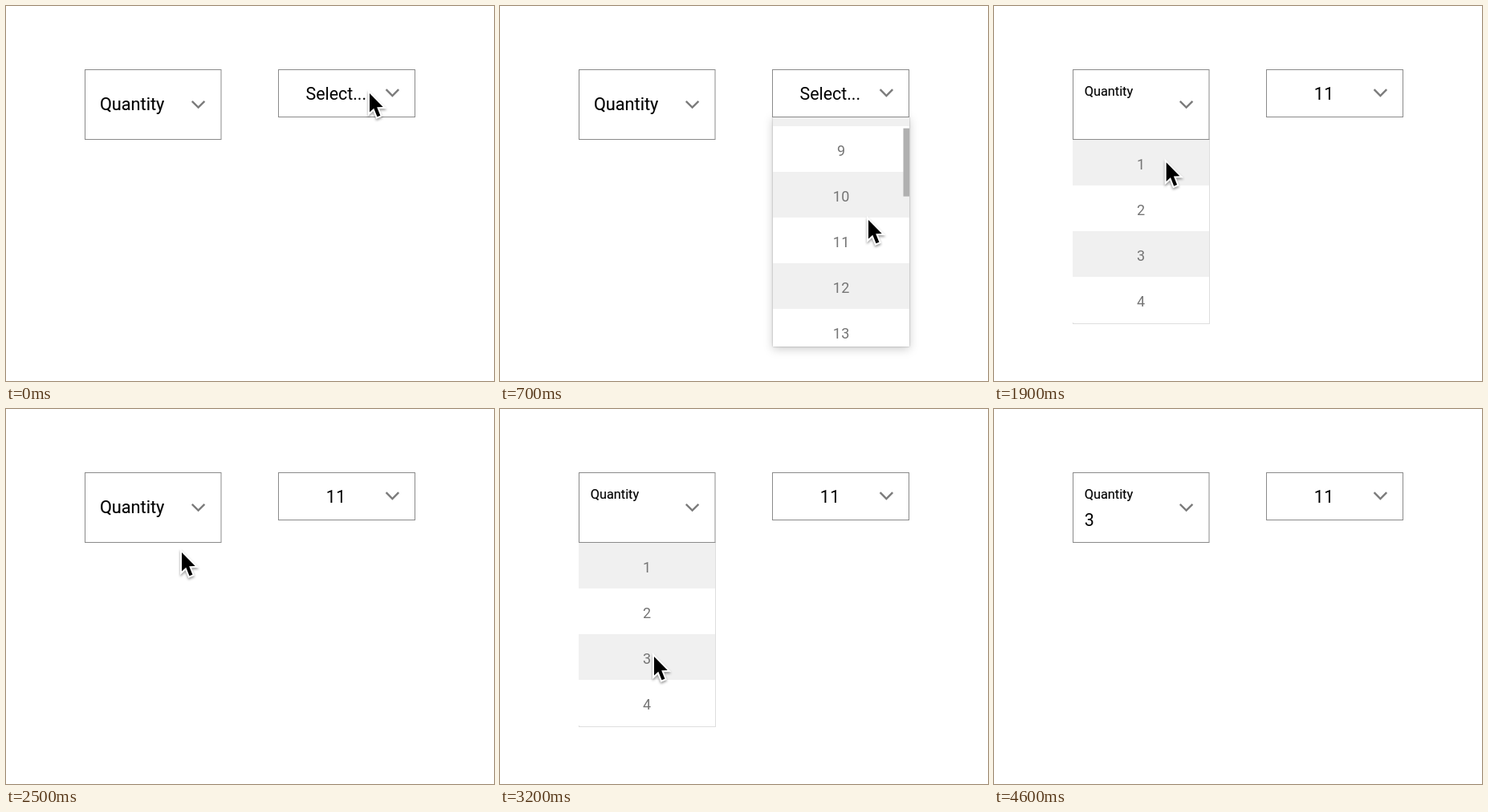
Recreate the animation shown at these times as an HTML page. Size 608 by 468 pixels, loop 4.8 s.

```html
<!DOCTYPE html>
<html lang="en">
<head>
<meta charset="utf-8">
<title>Quantity dropdowns</title>
<style>
  html, body { margin: 0; width: 100%; height: 100%; overflow: hidden; background: #fff; }
  svg { display: block; width: 608px; height: 468px; font-family: Roboto, Arial, sans-serif; }
  .box { fill: #fff; stroke: #8a8a8a; }
  .chevron { fill: none; stroke: #7b7b7b; stroke-width: 2.4; }
  .item { font-size: 18px; letter-spacing: .25px; fill: #757575; text-anchor: middle; }
  .value { font-size: 21.4px; }
  .label { stroke: #000; stroke-width: .15px; }
  .shadow { fill: #fff; filter: drop-shadow(0 .5px 1px rgba(0,0,0,.3)) drop-shadow(0 3px 6px rgba(0,0,0,.2)); }
  .cursor { fill: #000; stroke: #fff; stroke-width: 4; paint-order: stroke;
            filter: drop-shadow(0 2px 1.5px rgba(0,0,0,.38)); }
</style>
</head>
<body>
<svg viewBox="0 0 608 468">
  <clipPath id="view"><rect x="340" y="138" width="170" height="287"/></clipPath>

  <g id="menuR">
    <rect class="shadow" x="340" y="138" width="170" height="287"/>
    <g clip-path="url(#view)">
      <g id="listR"></g>
      <rect id="thumb" x="502.5" width="8" height="85" fill="#b0b0b0"/>
    </g>
  </g>
  <rect class="box" x="339.5" y="79.5" width="170" height="59"/>
  <text id="valueR" class="value" x="411.3" y="117.4" text-anchor="middle"></text>
  <path class="chevron" d="M473.6 104.2l7.8 7.8 7.8-7.8"/>

  <g id="menuL">
    <rect x="98.5" y="166.5" width="170" height="230" fill="#fff" stroke="#dedede"/>
    <g id="listL"></g>
  </g>
  <rect class="box" x="98.5" y="79.5" width="169.5" height="87"/>
  <text id="label" class="label">Quantity</text>
  <text id="valueL" class="value" x="112.8" y="146">3</text>
  <path class="chevron" d="M231.8 118.8l7.8 7.8 7.8-7.8"/>

  <path id="cursor" class="cursor" d="M0 0V23.6L5.3 18.7 9.5 29.3 13.4 27.7 9.2 17.2 16.7 17Z"/>
</svg>
<script>
const LOOP = 4800, STEP = 100, ROW = 57, VIEW = 287, COUNT_R = 17;
const $ = id => document.getElementById(id);
const mix = (a, b, k) => a + (b - a) * k;
const ramp = (t, from, to) => Math.min(1, Math.max(0, (t - from) / (to - from)));

// Pointer strokes: start, end, destination
const home = [453, 109];
const moves = [
  [0, 100, 459, 66],       // overshoot after clicking the right box
  [100, 500, 459, 267],    // into the list
  [900, 1300, 423, 286],   // choose 11
  [1400, 1700, 230, 132],  // open the left box
  [1700, 2000, 207, 227],
  [2000, 2200, 350, 258],  // click outside
  [2300, 2500, 219, 179],
  [2500, 2700, 213, 137],  // open again
  [2700, 2900, 192, 309],  // choose 3
  [3500, 3800, 198, 309],
  [4000, 4300, 300, 274],
  [4400, 4500, 217, 146]
];

function pointer(t) {
  return moves.reduce(([px, py], [from, to, x, y]) => {
    const k = ramp(t, from, to);
    return [mix(px, x, k), mix(py, y, k)];
  }, home);
}

function add(parent, tag, attrs, text = '') {
  const el = document.createElementNS('http://www.w3.org/2000/svg', tag);
  for (const key in attrs) el.setAttribute(key, attrs[key]);
  el.textContent = text;
  parent.append(el);
  return el;
}

// Returns the row rectangles so that they can be tinted
function fillList(list, first, count, x, y) {
  return Array.from({ length: count }, (_, i) => {
    const top = y + i * ROW;
    const row = add(list, 'rect', { x, y: top, width: 170, height: ROW, fill: i % 2 ? '#fff' : '#f0f0f0' });
    add(list, 'text', { class: 'item', x: x + 85.2, y: top + 37.4 }, first + i);
    return row;
  });
}

const rowsR = fillList($('listR'), 8, COUNT_R, 340, 139);
const rowsL = fillList($('listL'), 1, 4, 98, 167);

function tint(row, base, k) {
  const v = Math.round(mix(base, 202, k));
  row.setAttribute('fill', `rgb(${v},${v},${v})`);
}

function draw(t) {
  // Right box: open, scroll, choose
  const scroll = mix(0, 46, ramp(t, 600, 700)) + mix(0, 11, ramp(t, 700, 800));
  const chosen = t >= 1200;
  $('menuR').style.opacity = ramp(t, 100, 400) - ramp(t, 1100, 1300);
  $('listR').setAttribute('transform', `translate(0 ${-scroll})`);
  $('thumb').setAttribute('y', 139 + scroll * VIEW / (COUNT_R * ROW));
  tint(rowsR[3], 255, ramp(t, 900, 1000));
  $('valueR').textContent = chosen ? '11' : 'Select...';
  $('valueR').style.letterSpacing = chosen ? '.6px' : '0';

  // Left box: open, dismiss, open again, choose
  const raised = ramp(t, 1700, 1900) - ramp(t, 2300, 2500) + ramp(t, 2600, 2800);
  const picked = ramp(t, 4000, 4200);
  const tap = ramp(t, 3000, 3100) - ramp(t, 3100, 3200);
  $('menuL').style.opacity = raised - picked;
  tint(rowsL[2], 240, tap / 2 + ramp(t, 3700, 3900));
  $('label').setAttribute('x', mix(116.9, 112.8, raised));
  $('label').setAttribute('y', mix(130, 111.6, raised));
  $('label').style.fontSize = mix(21.7, 16.3, raised) + 'px';
  $('valueL').style.opacity = picked;

  $('cursor').setAttribute('transform', `translate(${pointer(t)})`);
  $('cursor').style.opacity = t < 4600 ? 1 : 0;
}

const start = performance.now();
function tick() {
  const t = (performance.now() - start) % LOOP;
  draw(Math.floor(t / STEP) * STEP);
  requestAnimationFrame(tick);
}
tick();
</script>
</body>
</html>
```
